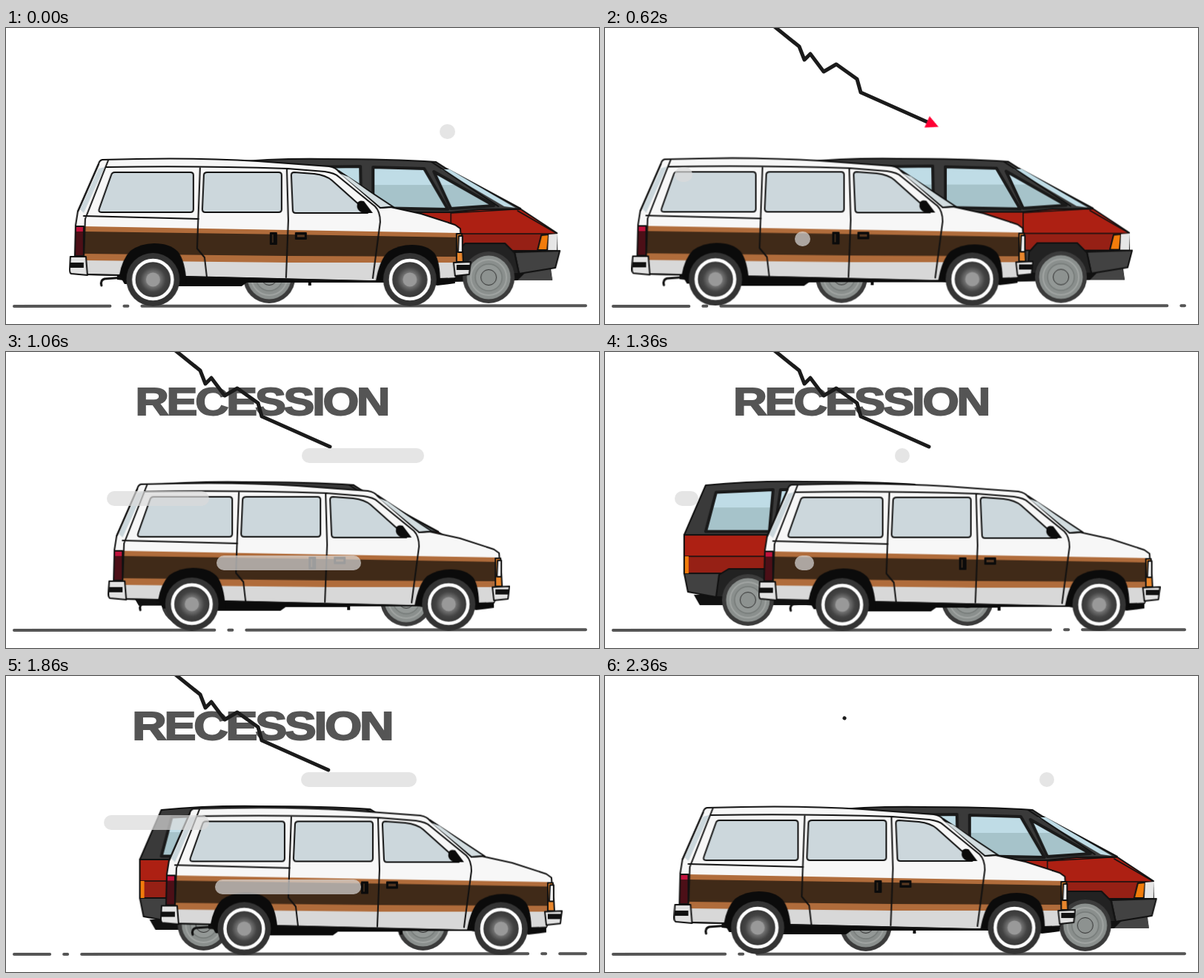
Write an HTML page that moves like this. It is 800x400 px and loops after 2.38 s.

```html
<!DOCTYPE html>
<html lang="en">
<head>
<meta charset="utf-8">
<title>Two vans</title>
<style>
  html, body { margin: 0; width: 100%; height: 100%; overflow: hidden; background: #fff; }
  :root { --loop: 2380ms; --pass: calc(var(--loop) / 3); }
  #stage { position: relative; width: 800px; height: 400px; overflow: hidden; }
  svg { position: absolute; left: 0; top: 0; }
  .ln { fill: none; stroke: #111; stroke-width: 2; stroke-linejoin: round; stroke-linecap: round; }
  .edge { stroke: #111; stroke-width: 2; stroke-linejoin: round; }

  /* vans */
  .white { animation: white var(--loop) linear infinite; }
  .red { animation: red var(--loop) linear infinite; }
  @keyframes white {
    0% { transform: translate(0, 0); }
    17.56% { transform: translate(-96.5px, -1.2px); }
    67.8% { transform: translate(180px, 2.2px); }
    100% { transform: translate(3px, 0); }
  }
  @keyframes red {
    0%, 100% { transform: translate(0, 0); }
    8.65% { transform: translate(35px, .4px); }
    58.6% { transform: translate(-168px, -2px); }
  }

  /* road */
  .road {
    stroke: #555; stroke-width: 4; stroke-linecap: round; stroke-dasharray: 602 19 5 19;
    animation: road calc(var(--loop) / 4) linear infinite;
  }
  @keyframes road { from { stroke-dashoffset: 471.5; } to { stroke-dashoffset: 1116.5; } }

  /* falling chart */
  .chart {
    fill: none; stroke: #1b1b1b; stroke-width: 5; stroke-linecap: round; stroke-linejoin: round;
    animation: chart var(--loop) infinite;
  }
  @keyframes chart {
    0% { stroke-dasharray: 0 200; stroke-dashoffset: 0; animation-timing-function: cubic-bezier(.4,0,.4,1); }
    20.2% { stroke-dasharray: 100 200; stroke-dashoffset: 0; }
    76% { stroke-dasharray: 100 200; stroke-dashoffset: 0; animation-timing-function: ease-in-out; }
    99.5%, 100% { stroke-dasharray: 0 200; stroke-dashoffset: -50; }
  }
  .tip {
    fill: #f03;
    offset-path: path("M226 -4L262 25L269 43L277 35L295 59L312 49L340 69L345 87L437 128");
    offset-rotate: auto;
    animation: slide var(--loop) infinite, tip var(--loop) infinite ease-in-out;
  }
  @keyframes slide {
    0% { offset-distance: 0%; animation-timing-function: cubic-bezier(.4,0,.4,1); }
    20.2%, 100% { offset-distance: 100%; }
  }
  @keyframes tip {
    0% { transform: scale(0); }
    2%, 24% { transform: scale(1); }
    30.5%, 100% { transform: scale(0); }
  }

  /* headline */
  .word {
    --full: polygon(150px 40px, 545px 40px, 545px 50px, 545px 70px, 545px 80px, 545px 96px, 150px 96px, 150px 80px, 150px 60px);
    --part: polygon(287px 46px, 333px 46px, 343px 62px, 343px 77px, 327px 77px, 327px 90px, 312px 90px, 312px 57px, 287px 57px);
    --none: polygon(320px 66px, 320px 66px, 320px 66px, 320px 66px, 320px 66px, 320px 66px, 320px 66px, 320px 66px, 320px 66px);
    animation: wipe var(--loop) linear infinite;
  }
  @keyframes wipe {
    0%, 27% { clip-path: var(--none); }
    32% { clip-path: var(--part); }
    40%, 79% { clip-path: var(--full); }
    88.2% { clip-path: var(--part); }
    93%, 100% { clip-path: var(--none); }
  }
  .word g { animation: grow var(--loop) linear infinite; }
  @keyframes grow {
    0%, 26% { transform: translate(346px, 67.5px) scale(.985); }
    44.5% { transform: translate(346px, 67.5px) scale(1); }
    79% { transform: translate(346.5px, 67.5px) scale(1.028); }
    88.2%, 100% { transform: translate(360px, 67.5px) scale(1.036); }
  }
  .word text {
    font: bold 51.5px "Liberation Sans", Arial, sans-serif; letter-spacing: -2.6px;
    fill: #555; stroke: #555; stroke-width: 1.8; text-anchor: middle;
  }

  /* wind */
  .wind {
    position: absolute; height: 20px; border-radius: 10px; background: rgba(218,218,218,.7);
    animation: head var(--pass) infinite, tail var(--pass) infinite, blink var(--pass) infinite step-end;
    animation-delay: var(--d);
  }
  @keyframes head {
    0%, 1.5% { left: var(--a); animation-timing-function: cubic-bezier(.25,0,.15,1); }
    49.4%, 100% { left: var(--b); }
  }
  @keyframes tail {
    0%, 28.3% { right: calc(780px - var(--a)); animation-timing-function: cubic-bezier(.25,0,.15,1); }
    76.2%, 100% { right: calc(780px - var(--b)); }
  }
  @keyframes blink { 0% { opacity: 1; } 76.5%, 100% { opacity: 0; } }
</style>
</head>
<body>
<div id="stage">
  <svg class="word" width="800" height="400">
    <g><text transform="scale(1.217 1)" x="-1" y="17.7">RECESSION</text></g>
  </svg>

  <svg width="800" height="400" viewBox="0 0 800 400">
    <defs>
      <radialGradient id="hub">
        <stop offset=".35" stop-color="#777"/>
        <stop offset=".65" stop-color="#444"/>
        <stop offset="1" stop-color="#333"/>
      </radialGradient>
      <linearGradient id="glass" x1="0" y1="188" x2="0" y2="244" gradientUnits="userSpaceOnUse">
        <stop offset=".42" stop-color="#bfdce6"/>
        <stop offset=".42" stop-color="#a6c3ca"/>
      </linearGradient>
      <g id="steel">
        <circle r="35" fill="#3b3b3b"/>
        <circle r="29.5" fill="#8a8f8d"/>
        <circle r="24" fill="none" stroke="#a0a4a2" stroke-width="2"/>
        <circle r="18" fill="#939896" stroke="#777c7a" stroke-width="1.5"/>
        <circle r="10.5" fill="#8d9290" stroke="#333"/>
      </g>
      <g id="whitewall">
        <circle r="36" fill="#333"/>
        <circle r="26" fill="url(#hub)" stroke="#fff" stroke-width="4.5"/>
        <circle r="9.5" fill="#999"/>
      </g>
    </defs>

    <path class="road" d="M11 376L782 375.2" fill="none"/>

    <path class="chart" pathLength="100" d="M226 -4L262 25L269 43L277 35L295 59L312 49L340 69L345 87L437 128"/>
    <path class="tip" d="M18 0L-3.5 -10.7V10.7Z"/>

    <g class="red">
      <path d="M282 330H700L735 326L737 341H690L560 344H290Z" fill="#111"/>
      <path d="M704 327L734 325L737 341H690Z" fill="#444"/>
      <path class="edge" d="M269 249L298 182Q360 176 430 177Q520 177 580 181L594 190L694 244L690 252H269Z" fill="#3a3a3a"/>
      <path class="edge" d="M269 249L600 249L640 245L694 244.5L743 277V301H269Z" fill="#ad2013"/>
      <path d="M270 278H742V300H270Z" fill="#962015"/>
      <path class="ln" style="stroke-width:1.5" d="M269 278H743M694 244.5L600 250V301M392 249V301M486 245V301M690 247L742 277"/>
      <path class="edge" d="M269 301H700V325L630 333H312L274 326Z" fill="#414141"/>
      <g class="edge" style="stroke:#1a1a1a;stroke-width:4" fill="url(#glass)">
        <path d="M312 191.5L389 188L384 244.5H298Z"/>
        <path d="M399 188L478 187L479 244H391Z"/>
        <path d="M495 188L564 190L596 245L495 243Z"/>
        <path d="M577 194L600 244L658 240Z"/>
      </g>
      <path d="M587 191L598 191L687 243L672 241Z" fill="#bfdce6"/>
      <path class="ln" d="M574 181L664 241"/>
      <path d="M384 257h10v5h-10z" fill="#111"/>
      <path d="M269 278h6v23h-5z" fill="#f27c0b"/>
      <path class="ln" d="M269 249V301"/>
      <path class="edge" d="M722 280L732 279L730 300H717Z" fill="#f27c0b"/>
      <path d="M732 279L744 278L743 300H731Z" fill="#e6e6e6"/>
      <path class="edge" d="M686 303L747 301L741 324L692 332Z" fill="#424242"/>
      <path class="edge" d="M608 303L619 291H673L686 304L692 332H606Z" fill="#222"/>
      <path class="edge" d="M316 303L329 295H384L394 304V333H312Z" fill="#222"/>
      <use href="#steel" x="355" y="337"/>
      <use href="#steel" x="651" y="337"/>
    </g>

    <g class="white">
      <path d="M150 332H606V345L582 348L560 343H412V348H408V344H325L318 349H232L150 340Z" fill="#0b0b0b"/>
      <path class="ln" style="stroke-width:3" d="M160 337L133 339Q127 341 129 348"/>
      <path class="edge" d="M449 193L523 242L505 246L447 199Z" fill="#ccd8dc"/>
      <path class="edge" d="M125 184Q126 179 130 178Q250 174 340 180L436 187Q446 189 449 194L505 243L519 242L560 251L606 266L613 271L616 316L606 338L490 342L243 336L108 333L94 309V267L97 248Z" fill="#f7f7f7"/>
      <path d="M125 190L100 245L105 250L133 188Z" fill="#cbd7dc"/>
      <path d="M451 197L462 201L517 241L506 242Z" fill="#d3dde0"/>
      <path d="M105 312L380 317L615 317L606 337L490 341L243 335L108 332Z" fill="#d8d8d8"/>
      <path d="M105 268L380 273L611 277L616 317H380L105 314Z" fill="#b06c3b"/>
      <path d="M105 275L380 279L611 283L614 309L380 308L105 305Z" fill="#402a18"/>
      <path class="ln" d="M125 184L97 248M138 179L107 258L105 312M135 188Q260 186 380 190L430 194Q444 196 449 201L498 241Q505 248 505 262L495 338M262 188L258 298L268 310L271 336M379 190L381 260L378 337M105 254L260 258M505 243L519 242M108 333L243 336L490 342"/>
      <g class="edge" fill="#ccd7dc">
        <path d="M147 195H249Q253 195 253 199V245Q253 249 249 249H129Q124 249 126 244L142 199Q143 195 147 195Z"/>
        <path d="M272 195H368Q372 195 372 199V245Q372 249 368 249H269Q265 249 265 245L267 199Q267 195 272 195Z"/>
        <path d="M389 195L416 197Q432 199 440 206L478 240L488 250H391Q387 250 387 246L385 199Q385 195 389 195Z"/>
      </g>
      <path d="M474 237Q476 232 483 234L495 250L482 250Q472 247 474 237Z" fill="#0b0b0b"/>
      <rect x="356" y="276" width="10" height="17" rx="1" fill="#0b0b0b"/>
      <path d="M360 279v11" stroke="#3a2a1c" stroke-width="2"/>
      <rect x="390" y="276" width="16" height="10" rx="1" fill="#0b0b0b"/>
      <path d="M393 281h10" stroke="#5a3a22" stroke-width="3"/>
      <path class="edge" d="M94 268H105V308H93Z" fill="#4c0f17"/>
      <path d="M95 269h9v6h-9z" fill="#c1123c"/>
      <path class="edge" d="M87 309H108L110 334L88 332Q86 331 86 326Z" fill="#e2e2e2"/>
      <path d="M87 317h18v7h-18z" fill="#111"/>
      <path class="edge" d="M608 278H615L617 316H608Z" fill="#e8862c"/>
      <path class="edge" d="M611 281H616V303H610Z" fill="#f1f1f1"/>
      <path class="edge" d="M604 317L627 316L625 333L606 335Z" fill="#e2e2e2"/>
      <path d="M608 320h18v7h-18z" fill="#111"/>
      <path d="M153 334Q157 312 168 301Q182 291 200 291Q221 291 232 302Q242 314 244 346H160Z" fill="#0b0b0b"/>
      <path d="M499 342Q504 313 516 302Q530 293 548 293Q568 293 578 304Q586 315 586 344H510Z" fill="#0b0b0b"/>
      <use href="#whitewall" x="198.5" y="340"/>
      <use href="#whitewall" x="545" y="340"/>
    </g>
  </svg>

  <i class="wind" style="top:130px; --a:586px; --b:391px; --d:-20ms"></i>
  <i class="wind" style="top:188px; --a:254px; --b:94px; --d:-696ms"></i>
  <i class="wind" style="top:275px; --a:459px; --b:256px; --d:-743ms"></i>
</div>
</body>
</html>
```
